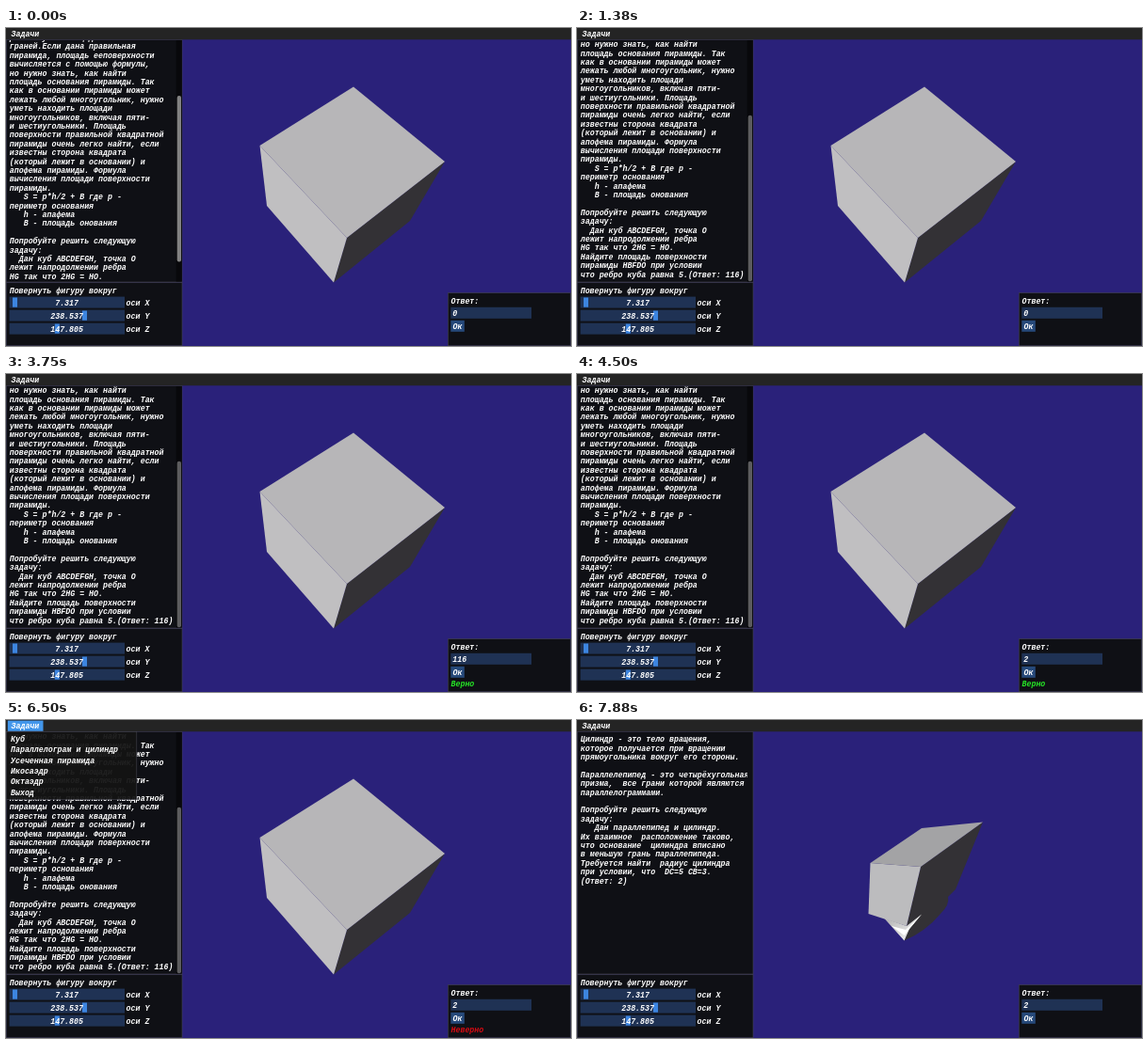
These frames come from a looping animation (600x338 px, 8 s). An HTML page:

```html
<!DOCTYPE html>
<html lang="ru">
<head>
<meta charset="utf-8">
<title>Задачи</title>
<style>
  html, body { margin: 0; width: 100%; height: 100%; overflow: hidden; background: #2a217a; }
  svg { display: block; width: 100vw; height: 100vh; }
  text { font: italic bold 8.27px "Liberation Mono", monospace; fill: #fff; white-space: pre; }
  .panel { fill: #0f1015; stroke: #44444f; stroke-width: .6; }
  .frame { fill: #1f3254; }
  .grab { fill: #3d85e0; }
  .hot { fill: #4296eb; }
  .mid { text-anchor: middle; }
</style>
</head>
<body>
<svg viewBox="0 0 600 338" preserveAspectRatio="none">
  <defs>
    <clipPath id="view"><rect x="1" y="13" width="180" height="255.5"/></clipPath>
    <linearGradient id="shine" x1="0" y1="0" x2="1" y2="1">
      <stop offset="0" stop-color="#aaa"/><stop offset="1" stop-color="#fff"/>
    </linearGradient>
  </defs>
  <rect width="600" height="338" fill="#2a217a"/>

  <g id="cube">
    <path fill="#333135" d="M362 223L466 142L429 205L348 270.500Z"/>
    <path fill="#c0bfc1" d="M269.500 125L362 223L348 270.500L277 189Z"/>
    <path fill="#b7b6b8" d="M369 62.500L466 142L362 223L269.500 125Z"/>
  </g>
  <g id="solid">
    <path fill="#333135" d="M365 156L431 108.500L402 180L394 188Q396 196 386 206Q370 225 347.500 234.500L350 219Z"/>
    <path fill="url(#shine)" d="M326 210.500L350 219L366 206.500L353 222L347.500 234.500Z"/>
    <path fill="#fff" d="M334 219L349 223L366 206.500L353 222L347.500 229Z"/>
    <path fill="#bcbcbe" d="M311.500 152L365 156L350 219L309.500 206Z"/>
    <path fill="#a3a3a5" d="M311.500 152L366 115L431 108.500L365 156Z"/>
  </g>

  <rect class="panel" x=".3" y="12.500" width="186.700" height="257.500"/>
  <g id="bar">
    <rect x="180.700" y="13" width="6" height="256.500" fill="#08080b"/>
    <rect id="thumb" x="181.700" width="4.300" height="176.500" rx="2"/>
  </g>
  <g clip-path="url(#view)">
    <g id="pyramid"></g>
    <g id="cylinder"></g>
  </g>

  <rect class="panel" x=".3" y="270.500" width="186.700" height="67.200"/>
  <text x="3.700" y="281.800">Повернуть фигуру вокруг</text>
  <g id="sliders"></g>

  <rect class="panel" x="469.300" y="281.700" width="130.400" height="56"/>
  <text x="472.500" y="293">Ответ:</text>
  <rect class="frame" x="472.300" y="296.800" width="85.700" height="12"/>
  <text id="answer" x="474.300" y="305.700"></text>
  <rect x="472.300" y="310.800" width="14.500" height="12" fill="#26497a"/>
  <text x="474.500" y="319.700">Ок</text>
  <text id="verdict" x="472.500" y="332"></text>

  <rect width="600" height="12.300" fill="#242424"/>
  <rect id="title" x="1.800" y=".6" width="37.700" height="11.200"/>
  <text x="5.500" y="9">Задачи</text>
  <g id="menu">
    <rect x=".3" y="12.500" width="138.500" height="72" fill="#141414" fill-opacity=".94" stroke="#44444f" stroke-width=".6"/>
    <rect id="hover" class="hot" x="3" width="133" height="11.200"/>
  </g>
</svg>

<script>
const LOOP = 8000, LINE = 9.4, ITEM = 11.35, SCROLL = 30.5;
const $ = id => document.getElementById(id);

function add(parent, tag, attrs, content = '') {
  const node = document.createElementNS('http://www.w3.org/2000/svg', tag);
  for (const key in attrs) node.setAttribute(key, attrs[key]);
  node.textContent = content;
  parent.append(node);
}

function addLines(id, x, y, step, content) {
  content.split('\n').forEach((line, i) => add($(id), 'text', { x, y: y + i * step }, line));
}

addLines('pyramid', 3.8, 13.1, LINE, `равна сумме площадей её
граней.Если дана правильная
пирамида, площадь ееповерхности
вычисляется с помощью формулы,
но нужно знать, как найти
площадь основания пирамиды. Так
как в основании пирамиды может
лежать любой многоугольник, нужно
уметь находить площади
многоугольников, включая пяти-
и шестиугольники. Площадь
поверхности правильной квадратной
пирамиды очень легко найти, если
известны сторона квадрата
(который лежит в основании) и
апофема пирамиды. Формула
вычисления площади поверхности
пирамиды.
   S = p*h/2 + B где p -
периметр основания
   h - апафема
   B - площадь онования

Попробуйте решить следующую
задачу:
  Дан куб ABCDEFGH, точка O
лежит напродолжении ребра
HG так что 2HG = HO.
Найдите площадь поверхности
пирамиды HBFDO при условии
что ребро куба равна 5.(Ответ: 116)`);

addLines('cylinder', 3.8, 23.1, LINE, `Цилиндр - это тело вращения,
которое получается при вращении
прямоугольника вокруг его стороны.

Параллелепипед - это четырёхугольная
призма,  все грани которой являются
параллелограммами.

Попробуйте решить следующую
задачу:
   Дан параллепипед и цилиндр.
Их взаимное  расположение таково,
что основание  цилиндра вписано
в меньшую грань параллепипеда.
Требуется найти  радиус цилиндра
при условии, что  DC=5 CB=3.
(Ответ: 2)`);

addLines('menu', 5, 23, ITEM, `Куб
Параллелограм и цилиндр
Усеченная пирамида
Икосаэдр
Октаэдр
Выход`);

[['X', '7.317', 7], ['Y', '238.537', 81], ['Z', '147.805', 51.8]].forEach(([axis, value, grab], i) => {
  const y = 285.6 + i * 14, box = $('sliders');
  add(box, 'rect', { class: 'frame', x: 3.6, y, width: 122.4, height: 12 });
  add(box, 'rect', { class: 'grab', x: grab, y: y + .9, width: 5, height: 10.2 });
  add(box, 'text', { class: 'mid', x: 64.6, y: y + 8.9 }, value);
  add(box, 'text', { x: 127.6, y: y + 8.9 }, 'оси ' + axis);
});

// Value of the last [time, value] pair already reached.
const at = (t, steps) => steps.reduce((value, [start, next]) => t >= start ? next : value, null);
const show = (id, on) => $(id).setAttribute('visibility', on ? 'visible' : 'hidden');

const answers = [[0, '0'], [1625, '1'], [1870, '11'], [2000, '116'], [4120, '2']];
const verdicts = [[0, ''], [2620, 'Верно'], [4870, 'Неверно'], [7370, '']];
const titles = [[0, 'none'], [6370, '#4296eb'], [6750, '#243c61'], [7620, 'none']];
const hovers = [[0, -1], [6750, 0], [7000, 1]];

function draw(t) {
  const drag = Math.min(1, Math.max(0, t / 875));
  const done = 1 - (1 - drag) ** 1.5;
  const solved = t >= 7620;
  const menuOpen = t >= 6490 && !solved;
  const hover = at(t, hovers);
  const verdict = at(t, verdicts);

  $('pyramid').setAttribute('transform', `translate(0 ${-SCROLL * done})`);
  $('thumb').setAttribute('y', 72 + 20.8 * done);
  $('thumb').setAttribute('fill', t < 1000 ? '#828282' : '#5c5c5e');
  for (const id of ['cube', 'pyramid', 'bar']) show(id, !solved);
  for (const id of ['solid', 'cylinder']) show(id, solved);

  $('answer').textContent = at(t, answers);
  $('verdict').textContent = verdict;
  $('verdict').style.fill = verdict === 'Верно' ? '#26e626' : '#d80a12';

  $('title').setAttribute('fill', at(t, titles));
  show('menu', menuOpen);
  show('hover', menuOpen && hover >= 0);
  $('hover').setAttribute('y', 14.7 + ITEM * hover);
}

const start = performance.now();
function tick() {
  draw((performance.now() - start) % LOOP);
  requestAnimationFrame(tick);
}
tick();
</script>
</body>
</html>
```
